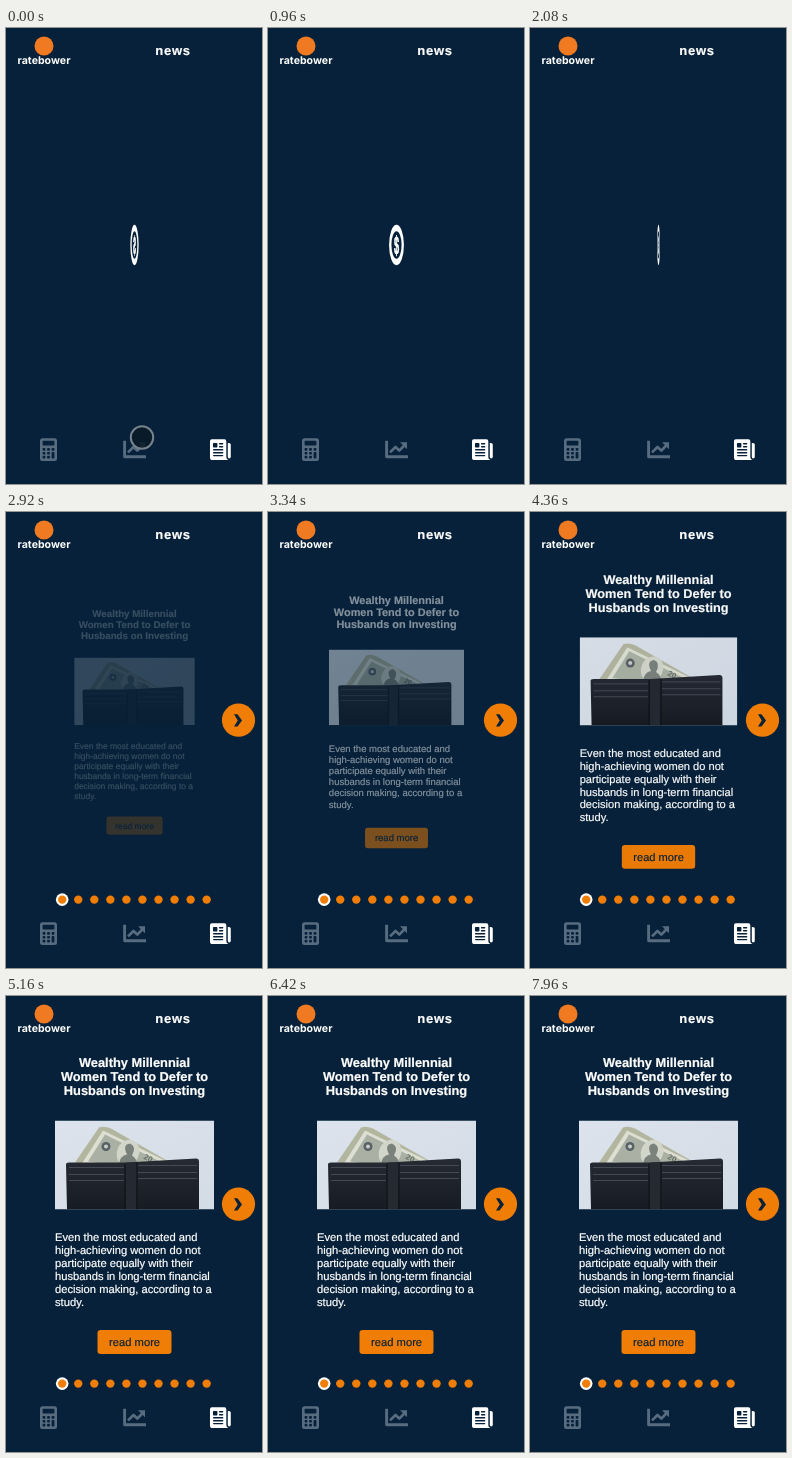
These frames come from a looping animation (256 px wide and 456 px high, 8000 ms). An HTML page:

```html
<!DOCTYPE html>
<html lang="en">
<head>
<meta charset="utf-8">
<title>News screen</title>
<style>
  html, body { margin: 0; width: 100%; height: 100%; overflow: hidden; background: #062139; }
  svg { display: block; width: 100vw; height: 100vh; font-family: "Liberation Sans", Arial, sans-serif; }
  text { text-rendering: geometricPrecision; }
  .bold { font-weight: bold; }
  .mid { text-anchor: middle; }
  .white { fill: #fff; }
  .heavy { stroke: #fff; stroke-width: .22; }
  .orange { fill: #f07d05; }
  .navy { fill: #062139; }
  .muted { fill: #586c80; }
  .line { fill: none; stroke: #586c80; }
</style>
</head>
<body>
<svg viewBox="0 0 256 456">
  <rect class="navy" width="256" height="456"/>

  <!-- header -->
  <circle cx="38" cy="18" r="9.5" fill="#ef7a22"/>
  <text class="white bold mid" x="38" y="35.5" font-size="10.6" font-family="Inter, sans-serif">ratebower</text>
  <text class="white heavy bold mid" x="167" y="26.8" font-size="13" letter-spacing=".8">news</text>

  <!-- loading coin -->
  <g id="coin">
    <circle r="17" fill="none" stroke="#fff" stroke-width="6.4"/>
    <text class="white bold mid" y="8.6" font-size="25" stroke="#fff" stroke-width="1">$</text>
  </g>

  <!-- article -->
  <g id="article">
    <g id="headline" class="white heavy bold mid" font-size="12.85"></g>
    <svg x="49" y="124.5" width="159" height="89" viewBox="0 0 159 89">
      <defs>
        <linearGradient id="wall" x2="1" y2="1">
          <stop offset="0" stop-color="#dce3ec"/><stop offset="1" stop-color="#d3dbe5"/>
        </linearGradient>
        <linearGradient id="leather" x2="0" y2="1">
          <stop offset="0" stop-color="#262a33"/><stop offset="1" stop-color="#171b23"/>
        </linearGradient>
      </defs>
      <rect width="159" height="89" fill="url(#wall)"/>
      <path d="M20 42L44 7Q49 5 56 8L112 40L106 50Z" fill="#b3b69f"/>
      <path d="M27 43L48 10L110 40L104 52Z" fill="#dcdfd2"/>
      <path d="M33 41L50 14L103 40L98 50Z" fill="#aab1a4"/>
      <ellipse cx="73" cy="32" rx="11" ry="13" fill="#d2d5ca" transform="rotate(27 73 32)"/>
      <path d="M64 44Q65 35 72 34Q67 24 75 23Q82 26 77 35Q82 38 82 44Z" fill="#7b827c"/>
      <circle cx="51" cy="26" r="4.5" fill="#596067"/>
      <circle cx="51" cy="26" r="2" fill="#c9cdc5"/>
      <text x="88" y="38" font-size="8" class="bold" fill="#6a7268" transform="rotate(27 88 38)">20</text>
      <path d="M11 44Q11 42 14 42L71 42L141 38Q144 38 144 41V89H12Z" fill="url(#leather)"/>
      <path d="M71 42H81V89H71Z" fill="#252932"/>
      <path d="M14 47H69M14 54H69M14 60H69M83 45H142M83 52H142M83 58H142" stroke="#454a55" fill="none"/>
      <path d="M70 43V89M82 42V89" stroke="#0d1117" fill="none"/>
    </svg>
    <g id="body" class="white heavy" font-size="11.2"></g>
    <rect class="orange" x="91.5" y="334" width="74" height="24" rx="3.2"/>
    <text class="navy mid" x="128.6" y="349.9" font-size="11.2" stroke="#062139" stroke-width=".15">read more</text>
  </g>

  <!-- carousel controls -->
  <g id="controls">
    <circle class="orange" cx="232.5" cy="208.2" r="16.6"/>
    <path class="navy" d="M228 202.2H231.5L236 208.4L231.5 214.6H228L231.8 208.4Z"/>
    <circle class="white" cx="56.2" cy="387.6" r="6.3"/>
    <g id="dots" class="orange"></g>
  </g>

  <!-- tab bar -->
  <rect class="muted" x="34" y="410.2" width="17" height="22.8" rx="2.5"/>
  <g id="keys" class="navy"><rect x="36.6" y="412.8" width="11.8" height="4.8" rx=".8"/></g>
  <path class="line" stroke-width="2.9" stroke-linejoin="round" d="M118.6 412.8V428.8H140"/>
  <path class="line" stroke-width="2.7" stroke-linejoin="round" d="M122 424.4L127.5 419L131.3 422.6L136.3 417.5"/>
  <path class="muted" d="M132 414.3H139V421.3Z"/>
  <g transform="translate(202.5 409.8) scale(.0464)">
    <path class="white" d="M384 416V72a40 40 0 0 0-40-40H72a40 40 0 0 0-40 40v352a56 56 0 0 0 56 56h344a64 64 0 0 1-48-64Z"/>
    <path class="white" d="M416 112h24a40 40 0 0 1 40 40v264a32 32 0 0 1-64 0Z"/>
    <rect class="navy" x="96" y="112" width="96" height="96" rx="16"/>
    <path d="M240 128h64M240 192h64M112 256h192M112 320h192M112 384h192" stroke="#062139" stroke-width="32" stroke-linecap="round"/>
  </g>

  <circle id="cursor" r="11.2" fill="#0a1926" fill-opacity=".85" stroke="#76838c" stroke-width="2"/>
</svg>
<script>
const LOOP = 8000;
const REVEAL = 2480;
const GROW_START = 2670, GROW_TIME = 2000;
const SPIN_START = 101.5, SPIN_SPEED = 0.3402; // degrees, degrees per ms

const $ = id => document.getElementById(id);
const clamp = v => Math.min(1, Math.max(0, v));

function add(parent, tag, attrs, text = "") {
  const node = document.createElementNS("http://www.w3.org/2000/svg", tag);
  for (const key in attrs) node.setAttribute(key, attrs[key]);
  node.textContent = text;
  parent.append(node);
}

function addLines(parent, x, y, step, lines) {
  lines.forEach((line, i) => add(parent, "text", { x, y: y + i * step }, line));
}

addLines($("headline"), 128.5, 70.6, 14.4, [
  "Wealthy Millennial", "Women Tend to Defer to", "Husbands on Investing"]);
addLines($("body"), 49, 245, 13.05, [
  "Even the most educated and", "high-achieving women do not", "participate equally with their",
  "husbands in long-term financial", "decision making, according to a", "study."]);

for (let i = 0; i < 10; i++) add($("dots"), "circle", { cx: 56.2 + i * 16.05, cy: 387.6, r: 4.2 });

// eight keys: the last one in the right column spans two rows
for (let i = 0; i < 8; i++) {
  add($("keys"), "rect", {
    x: 36.6 + (i % 3) * 4.5, y: 420 + Math.floor(i / 3) * 3.9,
    width: 2.8, height: i === 5 ? 6.6 : 2.7, rx: .8 });
}

function draw(t) {
  const loaded = t >= REVEAL;
  $("coin").style.display = loaded ? "none" : "";
  $("controls").style.display = loaded ? "" : "none";

  const turn = Math.cos((SPIN_START + SPIN_SPEED * t) * Math.PI / 180);
  const width = Math.sign(turn) * Math.max(Math.abs(turn), .07);
  $("coin").setAttribute("transform", `translate(128.5 217) scale(${width} 1)`);

  const grow = Math.sin(clamp((t - GROW_START) / GROW_TIME) * Math.PI / 2);
  const scale = .7 + .3 * grow;
  $("article").setAttribute("opacity", grow);
  $("article").setAttribute("transform", `translate(128.5 212) scale(${scale}) translate(-128.5 -212)`);

  const glide = clamp((t - 20) / 480);
  const eased = glide * glide * (3 - 2 * glide);
  $("cursor").setAttribute("transform", `translate(${136 + 84 * eased} ${409.5 + 12 * eased})`);
  $("cursor").setAttribute("opacity", 1 - clamp((t - 500) / 250));
}

const start = performance.now();
function tick() {
  draw((performance.now() - start) % LOOP);
  requestAnimationFrame(tick);
}
tick();
</script>
</body>
</html>
```
